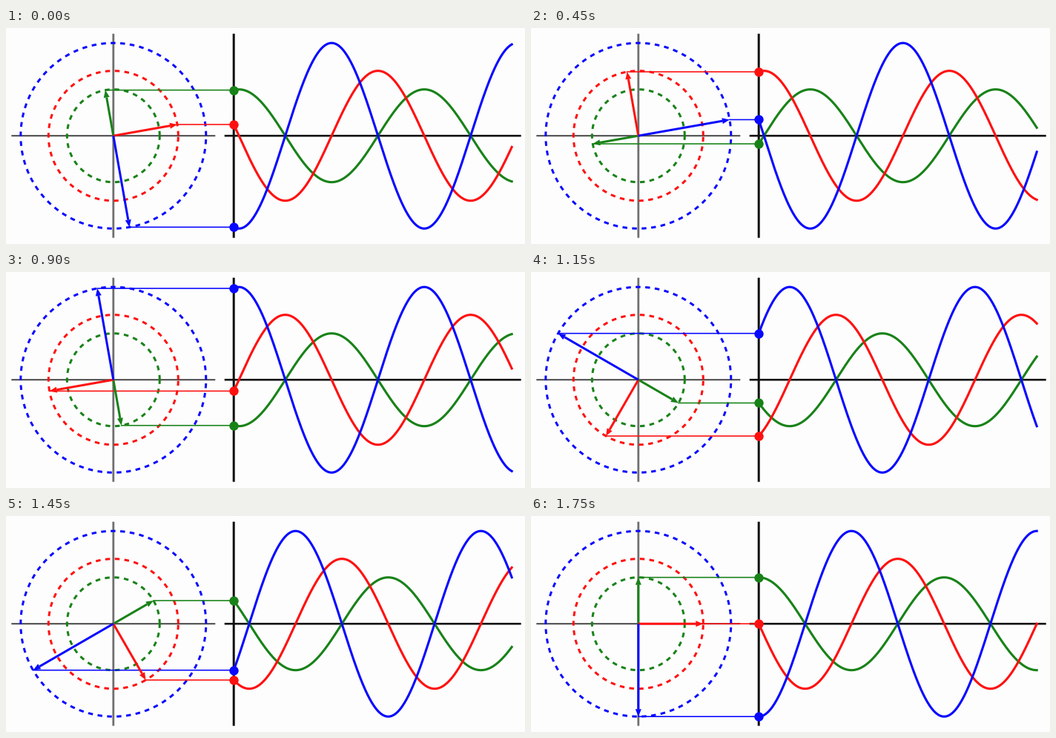
Write a matplotlib script that moves like this. It is 700x291 px and loops after 1800 ms.

```python
import numpy as np
import matplotlib.pyplot as plt
from matplotlib.animation import FuncAnimation

W, H, DPI = 700, 291, 100
PX = 72 / DPI                  # points per pixel
FRAMES, INTERVAL = 36, 50
CX, CY = 144.8, 145.2          # centre of the phasor diagram
X0, SPAN = 307.2, 375          # wave origin and width, 1.5 periods
REACH = 137.5                  # half length of the axes
DASH = (0, (2.15, 2.15))

# colour, amplitude, phase lead
PHASORS = [
    ("#188218", 62.5, np.pi / 2),
    ("#ff1010", 87.5, 0),
    ("#0808ff", 125, -np.pi / 2),
]

fig = plt.figure(figsize=(W / DPI, H / DPI), dpi=DPI, facecolor="#fdfdfd")
ax = fig.add_axes([0, 0, 1, 1])
ax.set(xlim=(0, W), ylim=(H, 0))
ax.axis("off")


def line(xs, ys, color, width, z, **kw):
    return ax.plot(xs, ys, color=color, lw=width * PX, zorder=z,
                   snap=False, **kw)[0]


def axis_line(xs, ys, color, width):
    line(xs, ys, color, width, 1, solid_capstyle="butt")


axis_line([CX - REACH, CX + REACH], [CY, CY], "#484848", 2)
axis_line([CX, CX], [CY - REACH, CY + REACH], "#707070", 2.8)
axis_line([X0 - 12.5, X0 + SPAN + 12.5], [CY, CY], "#101010", 2.6)
axis_line([X0, X0], [CY - REACH, CY + REACH], "#101010", 3)

phase = np.linspace(0, 3 * np.pi, 400)
wave_x = X0 + SPAN * phase / phase[-1]
turn = np.linspace(0, 2 * np.pi, 400)


class Phasor:
    def __init__(self, color, radius, lead):
        self.radius, self.lead = radius, lead
        line(CX + radius * np.cos(turn), CY - radius * np.sin(turn),
             color, 3, 2, ls=DASH)
        self.wave = line([], [], color, 3.1, 3)
        self.link = line([], [], color, 1.6, 4)
        self.shaft = line([], [], color, 3, 5, solid_capstyle="butt")
        self.head = ax.fill([0], [0], color=color, lw=0, zorder=5)[0]
        self.dot = line([], [], color, 1, 6, marker="o",
                        ms=12.4 * PX, mew=0)

    def update(self, theta):
        angle = theta + self.lead
        along = np.array([np.cos(angle), -np.sin(angle)])
        across = np.array([-along[1], along[0]])
        center = np.array([CX, CY])
        tip = center + self.radius * along
        neck = tip - 10 * along
        self.shaft.set_data(*np.transpose([center, neck]))
        self.head.set_xy([tip, neck + 4 * across, neck - 4 * across])
        self.link.set_data([tip[0], X0], [tip[1], tip[1]])
        self.dot.set_data([X0], [tip[1]])
        self.wave.set_data(wave_x, CY - self.radius * np.sin(angle - phase))


phasors = [Phasor(*p) for p in PHASORS]


def draw(i):
    theta = 2 * np.pi * (i + 1) / FRAMES
    for p in phasors:
        p.update(theta)
    return []


anim = FuncAnimation(fig, draw, frames=FRAMES, interval=INTERVAL,
                     repeat=True, repeat_delay=0)
plt.show()
```
